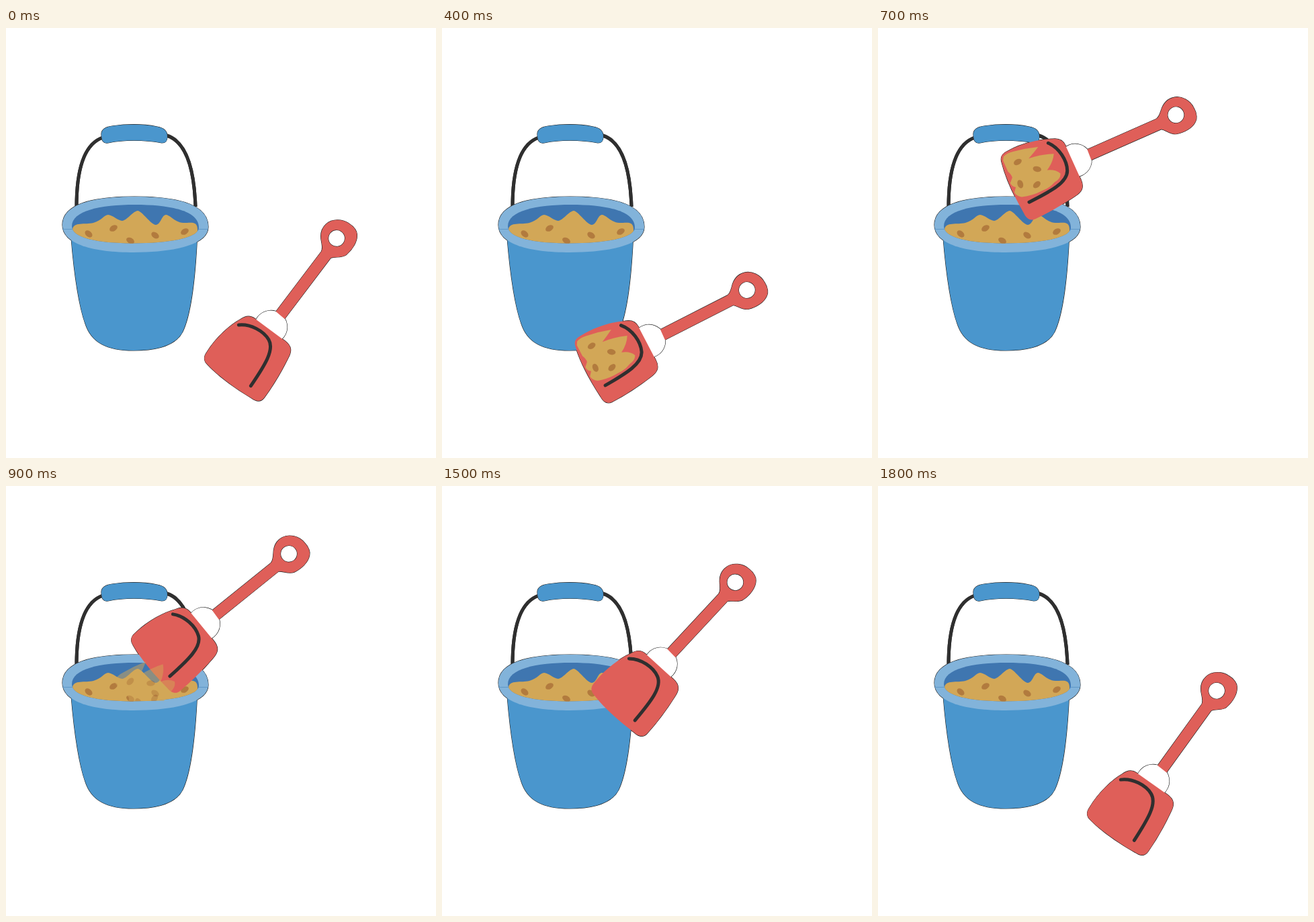
Animation of 640x640 px, one loop 1900 ms. Source, as an HTML page:

```html
<!DOCTYPE html>
<html lang="en">
<head>
<meta charset="utf-8">
<title>Bucket and shovel</title>
<style>
  html, body { margin: 0; height: 100%; overflow: hidden; background: #fff; }
  svg { display: block; width: 100%; height: 100%; }
  .blue { fill: #4a96cd; }
  .red { fill: #df5f59; }
  .sand { fill: #d2a757; }
  .cord { fill: none; stroke: #2f2f2f; stroke-width: 5; }
</style>
</head>
<body>
<svg viewBox="0 0 640 640">
  <defs>
    <ellipse id="seed" rx="6.300" ry="4.200" fill="#b27b3e"/>
    <path id="inner" d="M98 295C98 272 140 263 192 263C245 263 287 272 287 297C287 312 245 320.500 190 320.500C135 320.500 98 312 98 295Z"/>
    <clipPath id="opening"><use href="#inner"/></clipPath>
    <clipPath id="aboveRim"><path d="M0 0H640V320H0Z"/></clipPath>

    <g id="scene">
      <path class="cord" d="M105 266C105 205 118 172 144 163M239 160C266 168 280 205 282 266"/>
      <path class="blue" d="M142 158C142 150 150 147 158 146C180 143 205 143 225 147C236 149 240 154 240 161C240 168 238 171 232 171C205 166 175 166 152 171C145 172 142 168 142 158Z"/>
      <path class="blue" d="M97 312C101 360 108 412 118 440C127 468 150 480 190 480C230 480 254 470 263 452C276 425 282 365 284.500 312Z"/>
      <path fill="#82b3da" d="M84 293C84 262 130 251 191 251C255 251 301 262 301 296C301 321 255 334 190 334C130 334 84 322 84 293Z"/>
      <path d="M84 299.500H101M285 299.500H301" stroke="#4a86bd" stroke-width=".6"/>
      <use href="#inner" fill="#3f76b0"/>
      <g id="heap" clip-path="url(#opening)" stroke="none">
        <path class="sand" d="M99 300C100 288 118 293 130 290S146 278 152 278S167 287 173 287S190 272 196 272S216 293 223 293S232 278 238 278S252 290 264 290S285 287 285 300V325H99Z"/>
      </g>

      <g id="shovel">
        <circle r="24.500" fill="#fff"/>
        <path class="red" fill-rule="evenodd" d="M23 -7.500L135 -6.500C140 -7 143 -11 147 -15C153 -22 162 -27 172 -25C184 -23 193 -10 193 2C194 12 190 19 187 21C179 28 165 29 153 26C145 23 142 15 136 10.500L22 9.500ZM177 0A12.500 12.500 0 1 0 152 0A12.500 12.500 0 1 0 177 0Z"/>
        <path class="red" d="M-4 -26V29C-4 43 -11 47 -22 48.500C-47 53 -72 55 -90 55C-99 55 -102 48 -102 40C-105 10 -105 -20 -101 -42C-100 -51 -95 -54 -86 -54C-60 -56 -33 -50 -18 -43C-8 -40 -4 -34 -4 -26Z"/>
        <path class="cord" stroke-linecap="round" d="M-26 -40C-14 -27 -11 -5 -17 9C-24 25 -51 27 -88 28.500"/>
      </g>

      <g id="load" stroke="none">
        <g id="scoop">
          <path class="sand" d="M-95 -49Q-88 -52 -79 -50Q-60 -47 -42 -41Q-51 -36 -62 -31Q-42 -29 -25 -22Q-31 -11 -44 -4Q-32 0 -28 9Q-31 16 -41 17Q-52 22 -63 21Q-80 22 -95 17Q-102 12 -102 6L-97 0Q-102 -3 -102 -9L-96 -15Q-95 -20 -98 -26V-44Z"/>
        </g>
      </g>
    </g>
  </defs>

  <!-- thin dark edge underneath, then the fills -->
  <use href="#scene" stroke="#222" stroke-width="1.200"/>
  <use href="#scene"/>
</svg>
<script>
const LOOP = 1900, STEP = 100;
const [heap, shovel, load, scoop] =
  ['heap', 'shovel', 'load', 'scoop'].map(id => document.getElementById(id));

const linear = k => k;
const easeIn = k => k * k;
const easeOut = k => 1 - (1 - k) ** 2.5;
const clamp = v => Math.min(1, Math.max(0, v));
const mix = (a, b, k) => a + (b - a) * k;

// Position is the shovel's neck; ease and bow (sideways arc) shape the way to the next pose.
const poses = [
  { t: 0, x: 394, y: 445, angle: -53.4, ease: linear, bow: 21 },
  { t: 400, x: 308, y: 466, angle: -27.5, ease: easeIn, bow: 0 },
  { t: 700, x: 293.5, y: 197, angle: -24.3, ease: easeOut, bow: 0 },
  { t: 1200, x: 294, y: 208.5, angle: -45.2, ease: linear, bow: 0 },
  { t: 1400, x: 294, y: 208.5, angle: -45.2, ease: linear, bow: 4.3 },
  { t: 1800, x: 409, y: 439, angle: -54.7 }
];

function place(t) {
  const i = Math.max(1, poses.findIndex(p => p.t >= t));
  const a = poses[i - 1], b = poses[i];
  const k = a.ease((t - a.t) / (b.t - a.t));
  const dx = b.x - a.x, dy = b.y - a.y;
  const arc = a.bow * Math.sin(Math.PI * k) / (Math.hypot(dx, dy) || 1);
  const x = mix(a.x, b.x, k) + dy * arc;
  const y = mix(a.y, b.y, k) - dx * arc;
  return `translate(${x} ${y}) rotate(${mix(a.angle, b.angle, k)})`;
}

function addSeed(parent, x, y, angle) {
  const seed = document.createElementNS('http://www.w3.org/2000/svg', 'use');
  seed.setAttribute('href', '#seed');
  seed.setAttribute('transform', `translate(${x} ${y}) rotate(${angle})`);
  parent.append(seed);
}

addSeed(heap, 123, 306.5, 40);
addSeed(heap, 160, 298, -30);
addSeed(heap, 185, 316.5, 30);
addSeed(heap, 222, 308.5, 35);
addSeed(heap, 266, 303, -30);
addSeed(scoop, -79, -33, -5);
addSeed(scoop, -57, -11.5, 37);
addSeed(scoop, -89, -1.5, 95);
addSeed(scoop, -67, 9.5, -15);

function draw() {
  const t = Math.floor(performance.now() % LOOP / STEP) * STEP;
  const pose = place(t);
  const fall = clamp((t - 700) / 400);

  shovel.setAttribute('transform', pose);
  scoop.setAttribute('transform', `translate(${-54 * fall} ${122 * fall}) ${pose}`);
  load.setAttribute('clip-path', fall ? 'url(#aboveRim)' : 'none');
  load.setAttribute('opacity', clamp((t - 100) / 300) * (1 - fall));
  requestAnimationFrame(draw);
}
draw();
</script>
</body>
</html>
```
